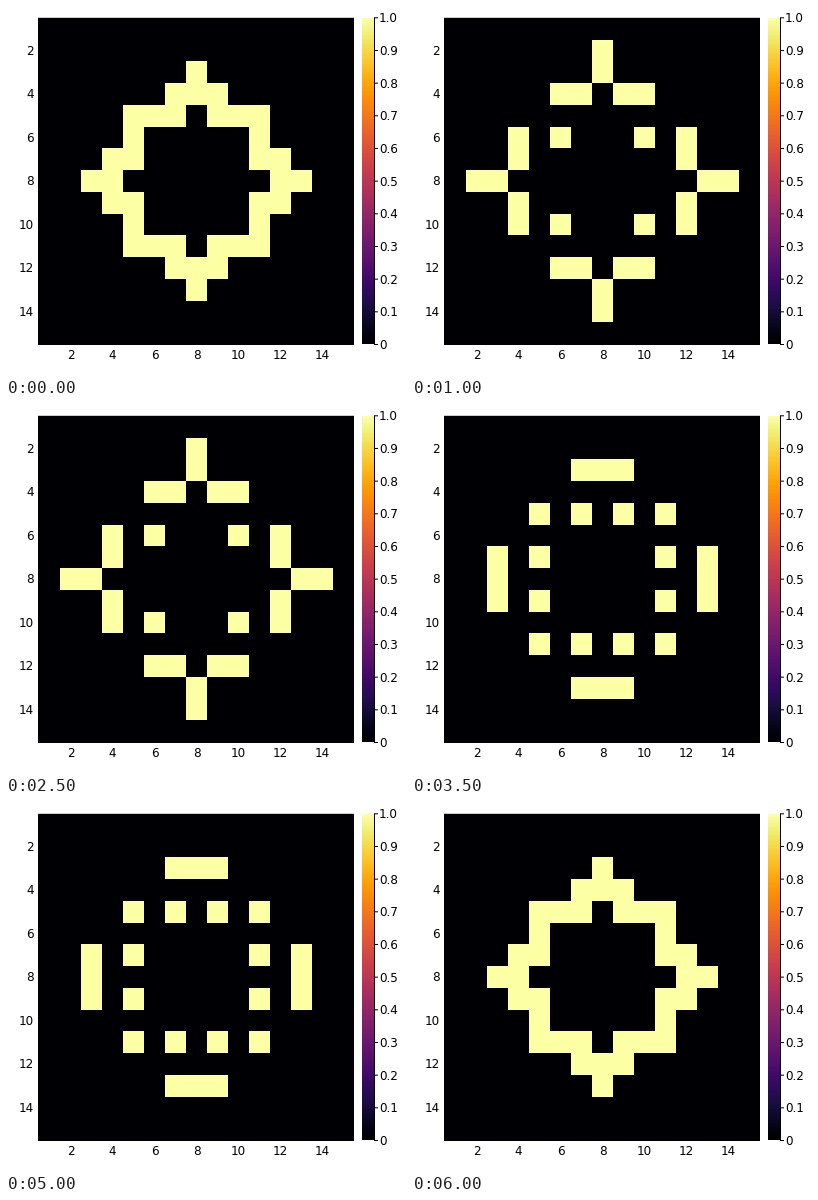
A matplotlib script that plays this animation: 400x370 px, repeating every 6.5 s.

```python
import matplotlib.pyplot as plt
import numpy as np
from matplotlib.animation import FuncAnimation
from matplotlib.patches import Rectangle

W, H, DPI = 400, 370, 100
N = 15
LEFT, RIGHT, TOP, BOTTOM = 33, 348, 11.8, 338
BAR_LEFT, BAR_RIGHT = 356, 368
AXIS_Y = BOTTOM + 0.5
PX = 72 / DPI
FRAMES, INTERVAL = 13, 500

plt.rcParams["font.family"] = "DejaVu Sans"


def first_grid():
    """Mirror one eighth of the oscillator about the centre cell."""
    grid = np.zeros((N, N), int)
    mid = N // 2
    for a, b in [(5, 0), (4, 0), (4, 1), (3, 1), (3, 2), (3, 3)]:
        for dy, dx in [(a, b), (b, a)]:
            for sy in (-1, 1):
                for sx in (-1, 1):
                    grid[mid + sy * dy, mid + sx * dx] = 1
    return grid


def life_step(grid):
    p = np.pad(grid, 1)
    around = sum(p[i:i + N, j:j + N] for i in range(3) for j in range(3)) - grid
    return ((around == 3) | ((grid == 1) & (around == 2))).astype(int)


grids = [first_grid()]
while len(grids) < FRAMES:
    grids.append(life_step(grids[-1]))

fig = plt.figure(figsize=(W / DPI, H / DPI), dpi=DPI, facecolor="white")
ax = fig.add_axes([0, 0, 1, 1])
ax.axis("off")


def mesh(data, x0, x1):
    rows, cols = data.shape
    xs = np.linspace(x0, x1, cols + 1).round()
    ys = np.linspace(TOP, BOTTOM, rows + 1).round()
    return ax.pcolormesh(xs, ys, data, cmap="inferno", vmin=0, vmax=1,
                         antialiased=False)


def label(x, y, text, ha):
    # y is the middle of the digits
    ax.text(x, y + 4.4, text, ha=ha, va="baseline", fontsize=12 * PX, color="black")


def line(xs, ys):
    ax.plot(xs, ys, color="black", lw=PX, solid_capstyle="butt", snap=False)


ax.add_patch(Rectangle((LEFT, TOP), RIGHT - LEFT, BOTTOM - TOP,
                       color="black", lw=0, snap=False))
cells = mesh(grids[0], LEFT, RIGHT)
mesh(np.linspace(1, 0, round(BOTTOM - TOP))[:, None], BAR_LEFT, BAR_RIGHT)
ax.set_xlim(0, W)
ax.set_ylim(H, 0)

line([LEFT - 0.5] * 2, [TOP, BOTTOM + 1])
line([LEFT - 1, RIGHT], [AXIS_Y] * 2)
line([BAR_RIGHT + 0.5] * 2, [TOP, BOTTOM + 1])

for k in range(2, N, 2):
    f = (k - 0.5) / N
    label(LEFT + f * (RIGHT - LEFT), 348.5, str(k), "center")
    label(28, TOP + f * (BOTTOM - TOP), str(k), "right")

for k in range(11):
    y = AXIS_Y + (TOP - AXIS_Y) * k / 10
    line([BAR_RIGHT, BAR_RIGHT + 4], [y, y])
    label(373, y, f"{k / 10:.1f}" if k else "0", "left")


def update(i):
    cells.set_array(grids[i])
    return [cells]


anim = FuncAnimation(fig, update, frames=FRAMES, interval=INTERVAL, repeat=True)
plt.show()
```
